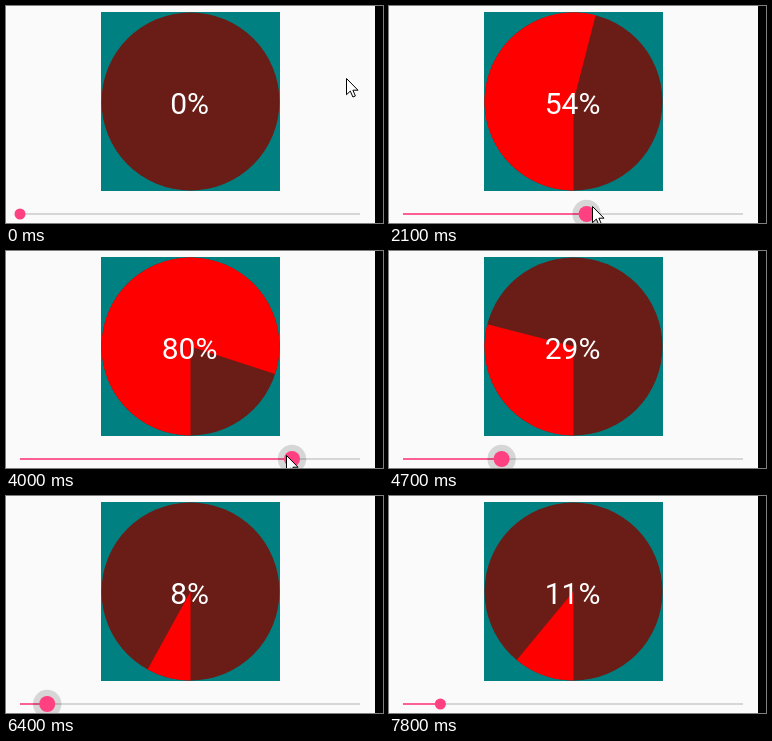
An HTML page that plays this animation: 377x217 px, repeating every 8300 ms.

```html
<!DOCTYPE html>
<html lang="en">
<head>
<meta charset="utf-8">
<title>Circular progress</title>
<style>
  html, body { margin: 0; width: 100%; height: 100%; overflow: hidden; background: #fafafa; }
  svg { display: block; width: 377px; height: 217px; }
  text { font: 30px Roboto, sans-serif; fill: #fff; text-anchor: middle; }
</style>
</head>
<body>
<svg viewBox="0 0 377 217">
  <rect width="377" height="217" fill="#fafafa"/>
  <rect x="95" y="6" width="179" height="179" fill="#008080"/>
  <circle cx="184.5" cy="95.5" r="89" fill="#6a1d16"/>
  <path id="pie" fill="#f00"/>
  <text id="label" x="183.6" y="108"></text>
  <path d="M14 208H354" stroke="#d6d6d6" stroke-width="2"/>
  <path id="track" stroke="#fb5f95" stroke-width="2"/>
  <circle id="halo" cy="208" r="14.2" fill="#000" fill-opacity=".14"/>
  <circle id="thumb" cy="208" fill="#ff4081"/>
  <rect x="369" width="8" height="217"/>
  <path id="cursor" d="M.5 .5V16.7L4.3 13.1L6.9 19L9.4 18L6.9 12.2H12Z" fill="#fff" stroke="#000"/>
</svg>
<script>
const LOOP = 8300, STEP = 100, LOOK_AHEAD = 25;
const PRESS = 1100, RELEASE = 7800;
const CX = 184.5, CY = 95.5, R = 89;
const $ = id => document.getElementById(id);

const linear = u => u;
const smooth = u => u * u * (3 - 2 * u);
const phase = (t, from, to) => Math.min(1, Math.max(0, (t - from) / (to - from)));
const knobX = percent => 14 + 3.4 * percent;

// Each drag: start, end, percent reached, pointer height reached, easing
const drags = [
  [1000, 3100, 100, 195, smooth],
  [3750, 4600, 32, 224, linear],
  [4600, 5850, 0, 224, linear],
  [6200, 7150, 70, 188, smooth],
  [7150, 7700, 11, 224, smooth]
];

function dragState(t) {
  let percent = 0, y = 206;
  for (const [start, end, toPercent, toY, ease] of drags) {
    const f = ease(phase(t, start, end));
    percent += (toPercent - percent) * f;
    y += (toY - y) * f;
  }
  return { percent, y };
}

// The pointer first comes in from the right, then runs slightly ahead of the knob.
function pointerAt(t) {
  const { percent, y } = dragState(t + LOOK_AHEAD);
  const away = 1 - smooth(phase(t, 0, 600));
  return [knobX(percent) + 1 + 325 * away, y - 134 * away].map(Math.round);
}

// The sector grows clockwise from the bottom.
function sector(percent) {
  if (percent === 100) return `M${CX} ${CY + R}a${R} ${R} 0 1 1 .01 0Z`;
  const a = percent / 50 * Math.PI;
  const x = CX - R * Math.sin(a), y = CY + R * Math.cos(a);
  return `M${CX} ${CY}v${R}A${R} ${R} 0 ${+(percent > 50)} 1 ${x} ${y}Z`;
}

function draw(now) {
  const t = Math.floor(now % LOOP / STEP) * STEP;
  const percent = Math.round(dragState(t).percent);
  const x = knobX(percent);
  const pressed = t >= PRESS && t < RELEASE;
  $('pie').setAttribute('d', sector(percent));
  $('label').textContent = percent + '%';
  $('track').setAttribute('d', `M14 208H${x}`);
  $('halo').setAttribute('cx', x);
  $('halo').setAttribute('visibility', pressed ? 'visible' : 'hidden');
  $('thumb').setAttribute('cx', x);
  $('thumb').setAttribute('r', pressed ? 8 : 5.5);
  $('cursor').setAttribute('transform', `translate(${pointerAt(t)})`);
}

let start;
function tick(now) {
  start ??= now;
  draw(now - start);
  requestAnimationFrame(tick);
}
draw(0);
requestAnimationFrame(tick);
</script>
</body>
</html>
```
